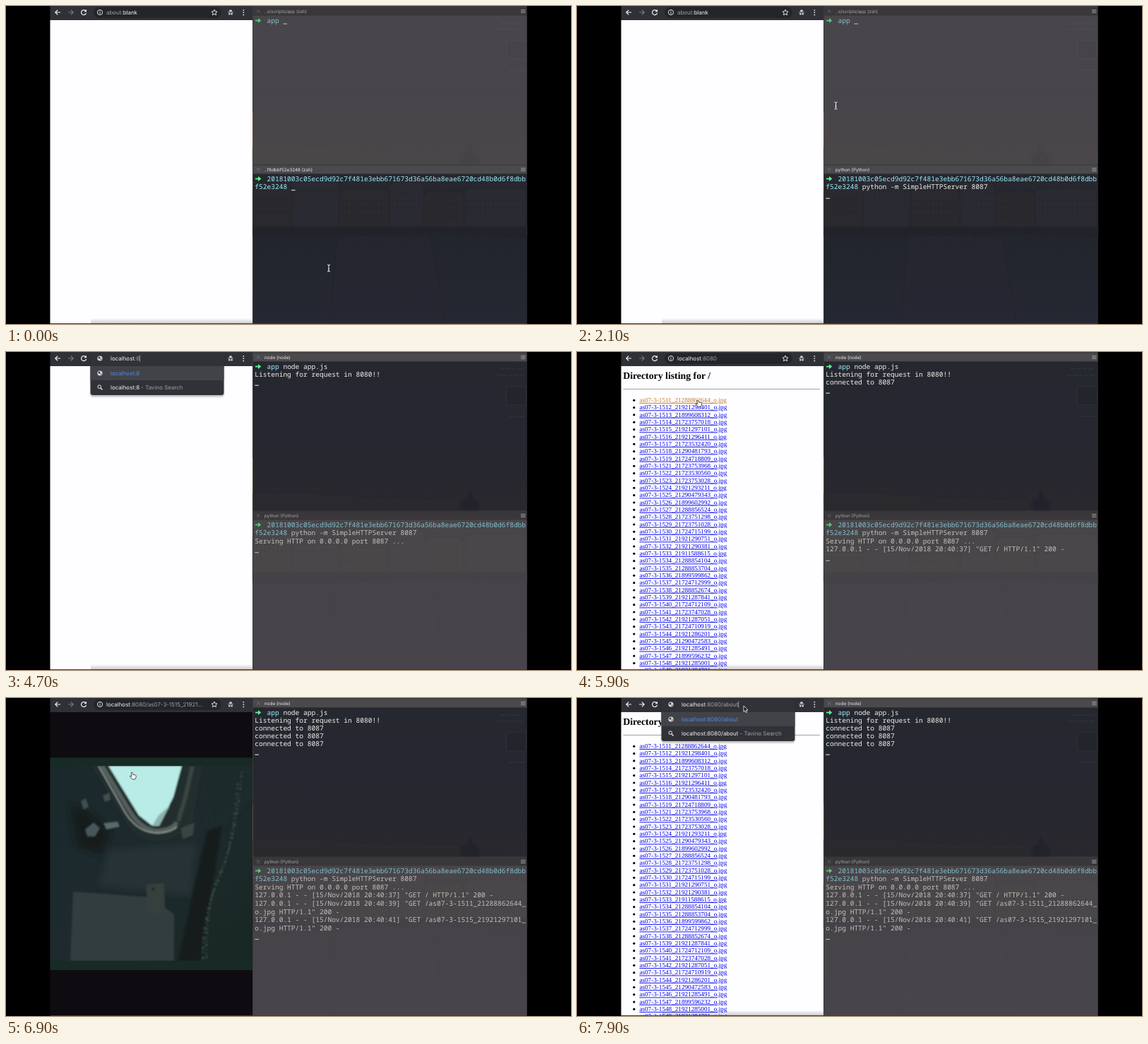
Animation of 800x450 px, one loop 8000 ms. Source, as an HTML page:

```html
<!DOCTYPE html>
<html lang="en">
<head>
<meta charset="utf-8">
<title>Proxy demo</title>
<style>
html, body { margin: 0; width: 100%; height: 100%; overflow: hidden; background: #000; }
svg { display: block; width: 800px; height: 450px; }
text { white-space: pre; text-rendering: geometricPrecision; }
.mono { font: 9.56px "Noto Sans Mono", monospace; fill: #eff0eb; }
.dir { fill: #9aedfe; }
.rows { opacity: .72; }
.on .rows { opacity: 1; }
.ui { font: 7.95px Inter, sans-serif; fill: #f1f3f4; }
.soft { fill: #9aa0a6; }
.tab { font: 6.35px Inter, sans-serif; fill: #a9a9a9; }
.on .tab { fill: #eee; }
.bar { fill: #39373a; }
.on .bar { fill: #4a494c; }
.on .veil { display: none; }
.head { font: bold 13.8px "Liberation Serif", serif; }
.link { font: 9.17px "Liberation Serif", serif; fill: #00e; text-decoration: underline; }
.link.hit { fill: #c9772c; }
.line { fill: none; stroke: #f1f3f4; stroke-width: 1.2; }
</style>
</head>
<body>
<svg viewBox="0 0 800 450">
  <defs>
    <linearGradient id="sky" x2="0" y2="1"><stop stop-color="#262830"/><stop offset=".5" stop-color="#262730"/><stop offset="1" stop-color="#29282e"/></linearGradient>
    <linearGradient id="water" x2="0" y2="1"><stop stop-color="#28282f"/><stop offset=".4" stop-color="#23252d"/><stop offset="1" stop-color="#252732"/></linearGradient>
    <linearGradient id="sea" x2=".45" y2="1"><stop stop-color="#5b8084"/><stop offset=".5" stop-color="#5a7a80"/><stop offset="1" stop-color="#4a6672"/></linearGradient>
    <linearGradient id="cabin" x2="1" y2="1"><stop stop-color="#1a292b"/><stop offset=".5" stop-color="#1e2a2e"/><stop offset="1" stop-color="#172722"/></linearGradient>
    <linearGradient id="shade" x2="0" y2="1"><stop stop-color="#000" stop-opacity="0"/><stop offset="1" stop-color="#000" stop-opacity=".2"/></linearGradient>
    <filter id="b1" x="-20%" y="-20%" width="140%" height="140%"><feGaussianBlur stdDeviation="1"/></filter>
    <filter id="b4" x="-50%" y="-50%" width="200%" height="200%"><feGaussianBlur stdDeviation="4"/></filter>
    <filter id="b12" x="-50%" y="-50%" width="200%" height="200%"><feGaussianBlur stdDeviation="12"/></filter>
    <filter id="cloud" x="-20%" y="-20%" width="140%" height="140%" color-interpolation-filters="sRGB">
      <feTurbulence type="fractalNoise" baseFrequency=".045 .06" numOctaves="5" seed="4" result="noise"/>
      <feColorMatrix in="noise" values="0 0 0 0 0  0 0 0 0 0  0 0 0 0 0  4 0 0 0 -1.35" result="holes"/>
      <feGaussianBlur in="SourceGraphic" stdDeviation="3"/>
      <feDisplacementMap in2="noise" scale="26" xChannelSelector="R" yChannelSelector="G"/>
      <feComposite in2="holes" operator="in"/>
    </filter>
    <clipPath id="pageClip"><rect x="62.5" y="20" width="286.5" height="429"/></clipPath>
    <clipPath id="photoClip"><rect x="71" y="98" width="274.5" height="275.5" rx="9"/></clipPath>
    <clipPath id="cabinClip"><rect x="62.5" y="96" width="286.5" height="276"/></clipPath>
    <g id="ibeam" fill="none" stroke="#eee" stroke-width="1"><path d="M-2-5q2 0 2 1.5q0-1.5 2-1.5M-2 5q2 0 2-1.5q0 1.5 2 1.5M0-4V4M-1 1H1"/></g>
    <path id="arrow" d="M0-4V4.5L1.9 2.8L3.2 5.6L4.6 5L3.3 2.2H6Z" fill="#111" stroke="#fff" stroke-width=".8"/>
    <path id="hand" d="M-2.2-4.4q1-.9 1.8 .2l.9 2.8l2.6 .2q1.6 .3 1.6 1.6l-.3 2.2l-1.1 2.4h-3.8l-3.4-3.6q-.5-1.2 .8-1.1l1.6 1Z" fill="#fff" stroke="#222" stroke-width=".8"/>
    <g id="prompt"><path d="M353 0H358" stroke="#5af78e" stroke-width="1.8"/><path d="M357-3.4L361.3 0L357 3.4Z" fill="#5af78e"/></g>
    <g id="globe"><circle r="3.6" fill="#d5d7da"/><path d="M-2.8-1.4L0-2.6L.5-.6L-1.2 .9ZM.6 1L2.6 .3L1.6 2.7Z" fill="#35363a"/></g>
  </defs>

  <rect width="800" height="450"/>
  <rect x="349" width="388.5" height="449.5" fill="#3b3a3c"/>
  <rect x="62.5" y="449" width="675" height="1" fill="#3b3a3c"/>
  <path d="M349.5 150V225" stroke="#5a5138" stroke-width="1"/>

  <!-- browser -->
  <rect x="62.5" y="20" width="286.5" height="429" id="paper" fill="#fefdff"/>
  <g clip-path="url(#pageClip)">
    <g id="list">
      <text class="head" x="65.2" y="37.6">Directory listing for /</text>
      <path d="M65.5 52.5H344" stroke="#8c8c8c" stroke-width=".8"/>
      <g id="links"></g>
    </g>
    <rect x="120" y="442" width="240" height="7" fill="url(#shade)"/>
    <g id="earth">
      <rect x="62" y="20" width="288" height="430" fill="#0e0c10"/>
      <rect x="62" y="84.5" width="288" height="300.5" fill="#182b27"/>
      <g clip-path="url(#photoClip)">
        <rect x="71" y="98" width="275" height="276" fill="url(#sea)"/>
        <g filter="url(#b12)">
          <path d="M275 190L360 140V290L300 300L255 270Z" fill="#8b918e" opacity=".65"/>
          <path d="M60 330L170 300L225 385H60Z" fill="#5e6c6c" opacity=".6"/>
          <path d="M275 385L300 320L360 275V385Z" fill="#2f6288" opacity=".85"/>
        </g>
        <path d="M66 94H94L76 118L71 160H66Z" fill="#31494b" filter="url(#b4)"/>
        <g filter="url(#cloud)">
          <path d="M196 158L235 112L275 92H335L325 122L288 140L255 164L222 170Z" fill="#a3cbc4"/>
          <path d="M262 205L290 168L318 150L352 140V195L318 205L300 222L272 226Z" fill="#b09c8a"/>
          <path d="M240 250L258 222L300 212L352 190V235L306 244L280 252L262 275L244 290Z" fill="#d0a888"/>
          <path d="M246 268L276 256L300 262L268 290L252 304L264 330L242 314Z" fill="#aa9585"/>
          <path d="M240 225L310 160L350 170V300L280 285Z" fill="#a8a49a" opacity=".55"/>
          <path d="M170 280L215 310L246 320L215 330L252 372L200 345Z" fill="#a99583" opacity=".8"/>
          <path d="M124 168L150 160L156 188L142 208L132 190Z" fill="#8fb2af" opacity=".8"/>
          <path d="M164 124L182 112L178 140Z" fill="#8fb2af" opacity=".7"/>
        </g>
        <path d="M256 238L272 231L287 228L278 236L262 245Z" fill="#e2bd9c" opacity=".75" filter="url(#b1)"/>
      </g>
    </g>
    <g id="window">
      <rect x="62" y="20" width="288" height="430" fill="#0e0c10"/>
      <rect x="62" y="84.5" width="288" height="300.5" fill="#172a25"/>
      <g clip-path="url(#cabinClip)">
        <rect x="62" y="96" width="288" height="276" fill="url(#cabin)"/>
        <g filter="url(#b4)">
          <path d="M90 150L118 160L150 190L134 222L100 210Z" fill="#131d1d"/>
          <path d="M146 215L270 205L262 280L130 265Z" fill="#253136"/>
          <path d="M265 96H350V140L290 200Z" fill="#1a2c2b"/>
        </g>
        <g filter="url(#b1)">
          <path d="M122 96L170 176Q190 208 222 202Q256 196 264 172L278 96Z" fill="#222d2d"/>
          <path d="M136 96L175 160Q192 187 214 188Q235 187 242 176" fill="none" stroke="#555e5c" stroke-width="6"/>
          <path d="M131 96L170 164Q188 191 215 191Q234 190 242 182" fill="none" stroke="#8d9691" stroke-width="1.8"/>
          <path d="M244 174L254 140L264 96" fill="none" stroke="#39453f" stroke-width="6"/>
          <path d="M145 96H249L237 140L217 180H206L188 166Z" fill="#b9ece6"/>
          <path d="M232 152L217 181H207L216 166Z" fill="#8fb3b0"/>
          <path d="M248 184L267 176L265 194L250 200Z" fill="#39443f"/>
          <path d="M112 186L124 176L133 184L126 196L115 196Z" fill="#46575a"/>
          <path d="M138 177L158 175L161 182L142 186Z" fill="#5b6b6d"/>
          <path d="M106 146L113 142L117 154L110 158ZM137 138L146 134L148 144L140 147Z" fill="#414f51"/>
          <path d="M95 274L205 282L238 306V372H91Z" fill="#303c40"/>
          <path d="M199 264L224 262L225 304L200 306Z" fill="#363f3d"/>
          <circle cx="208" cy="270" r="2" fill="#17211f"/>
          <path d="M285 188L306 180L275 372H244L266 270Z" fill="#131f1e"/>
          <path d="M334 105Q326 200 304 245T284 372" fill="none" stroke="#4c5d58" stroke-width="2" stroke-dasharray="1.5 3 3 5 1 4"/>
          <path d="M328 120Q322 210 300 260T279 372" fill="none" stroke="#35463f" stroke-width="3" stroke-dasharray="4 3 2 5"/>
        </g>
      </g>
    </g>
  </g>
  <rect x="62.5" width="286.5" height="20" fill="#303136"/>
  <rect x="124" y="1.5" width="181" height="15.5" rx="7.7" fill="#242529"/>
  <path class="line" d="M77 9H70M73.2 5.6L69.8 9L73.2 12.4"/>
  <path class="line" id="forward" d="M88 9H95M91.8 5.6L95.2 9L91.8 12.4"/>
  <path class="line" d="M112.6 6.6A3.5 3.5 0 1 0 113.5 9.8"/><path d="M114 4.7V8.2H110.5Z" fill="#f1f3f4"/>
  <path class="line" style="stroke-width:.9" d="M295 5L296.2 7.7L299 8L296.9 9.9L297.5 12.8L295 11.3L292.5 12.8L293.1 9.9L291 8L293.8 7.7Z"/>
  <g fill="#dfe1e3">
    <path d="M316 7.8L316.5 5.6H319.5L320 7.8ZM314.2 8.4H321.8V9.2H314.2Z"/>
    <circle cx="316.3" cy="11.2" r="1.2"/><circle cx="319.7" cy="11.2" r="1.2"/>
    <circle cx="336.3" cy="5.9" r=".9"/><circle cx="336.3" cy="9.2" r=".9"/><circle cx="336.3" cy="12.5" r=".9"/>
  </g>
  <g id="address">
    <circle class="line" cx="133" cy="9" r="3.6" style="stroke-width:.9"/><path class="line" d="M133 8.5V11.2M133 6.6V7.6" style="stroke-width:.9"/>
    <text class="ui" id="url" x="142" y="11.9"></text>
  </g>
  <g id="suggest">
    <path d="M119.5 0H308.5V57.5Q308.5 61 305 61H123Q119.5 61 119.5 57.5Z" fill="#000" opacity=".25" transform="translate(0 2.5)" filter="url(#b1)"/>
    <path d="M119.5 0H308.5V57.5Q308.5 61 305 61H123Q119.5 61 119.5 57.5Z" fill="#313237"/>
    <rect x="119.5" y="20" width="189" height="20" fill="#424348"/>
    <use href="#globe" x="133" y="9"/><use href="#globe" x="133" y="30"/>
    <circle class="line" cx="132.2" cy="49.2" r="2.3" style="stroke-width:1"/><path class="line" d="M134 51L136.5 53.5"/>
    <text class="ui" id="typed" x="148" y="11.9"></text>
    <text class="ui" id="match" x="148" y="32.9" style="fill:#4c8df0"></text>
    <text class="ui" id="query" x="148" y="53.3"></text>
  </g>

  <!-- terminal panes -->
  <g id="top">
    <rect class="bar" x="350" y="1.5" width="387.5" height="12"/>
    <rect x="350" y="13.5" width="387.5" height="211" fill="url(#sky)"/>
    <g filter="url(#b1)">
      <path d="M350 200H420L520 207L640 209V224H350Z" fill="#2a292e"/>
      <path d="M645 224V212L653 208L657 194L661 208L669 213V224Z" fill="#21222a"/>
    </g>
    <rect x="708.5" y="49" width="28" height="26" fill="#23252d" stroke="#2f3037"/>
    <path d="M700 24H733M694 33H735M712 91H734" stroke="#2d2f36" stroke-width="2" stroke-dasharray="6 2"/>
    <rect class="veil" x="350" y="13.5" width="387.5" height="211" fill="#726a6c" opacity=".45"/>
    <g class="rows"></g>
    <text class="tab" x="366" y="9.7"></text>
  </g>
  <g id="bottom">
    <rect class="bar" x="350" y="225.5" width="387.5" height="12"/>
    <rect x="350" y="237.5" width="387.5" height="211.5" fill="url(#water)"/>
    <g filter="url(#b1)" id="city"></g>
    <rect class="veil" x="350" y="237.5" width="387.5" height="211.5" fill="#726a6c" opacity=".45"/>
    <g class="rows"></g>
    <text class="tab" x="366" y="233.7"></text>
  </g>
  <g id="chrome" stroke="#aaa" stroke-width=".8"></g>
  <use id="mouse"/>
</svg>
<script>
const LOOP = 8000, STEP = 100, COLS = 67, CELL = 5.737;
const $ = s => document.querySelector(s);
const show = (s, on) => $(s).style.display = on ? '' : 'none';
const typing = (text, from, to, t) =>
  text.slice(0, Math.max(0, Math.round((t - from) / (to - from) * text.length)));

const photos = `1511_21288862644 1512_21921298401 1513_21899608312 1514_21723757018 1515_21921297101
1516_21921296411 1517_21723532420 1518_21290481793 1519_21724718809 1521_21723753968 1522_21723530560
1523_21723753028 1524_21921293211 1525_21290479343 1526_21899602992 1527_21288856524 1528_21723751298
1529_21723751028 1530_21724715199 1531_21921290751 1532_21921290381 1533_21911588615 1534_21288854104
1535_21288853704 1536_21899599862 1537_21724712999 1538_21288852674 1539_21921287841 1540_21724712109
1541_21723747028 1542_21921287051 1543_21724710919 1544_21921286201 1545_21290472583 1546_21921285491
1547_21899596232 1548_21921285001 1549_21921284701`.split(/\s+/).map(id => `as07-3-${id}_o.jpg`);

$('#links').innerHTML = photos.map((name, i) => {
  const y = 71.1 + i * 10.335;
  return `<circle cx="80.8" cy="${y - 2.8}" r="1.6"/><text class="link" x="88.4" y="${y}">${name}</text>`;
}).join('');

// Faint quayside buildings with rows of windows
const blocks = [[350, 262, 54], [405, 252, 66], [472, 266, 70], [543, 256, 48], [592, 270, 56], [649, 265, 88]];
$('#city').innerHTML = blocks.map(([x, y, w], i) =>
  `<path d="M${x} 312V${y}l6-7h${w - 12}l6 7V312Z" fill="${i % 2 ? '#2c2b30' : '#29292f'}"/>` +
  [10, 20, 30].map(d => `<path d="M${x + 4} ${y + d}H${x + w - 3}" stroke="#25252c" stroke-width="4" stroke-dasharray="2 4"/>`).join('')
).join('') + '<path d="M350 312H738V326L600 320L480 326H350Z" fill="#202229"/><path d="M470 326H600L620 449H460Z" fill="#292b35" opacity=".35"/>';

$('#chrome').innerHTML = [7.5, 231.5].map(y =>
  `<path d="M355 ${y - 2.2}l4.4 4.4m0-4.4l-4.4 4.4" opacity=".5"/><path d="M729 ${y - 2}h6.5m0 2h-6.5m0 2h6.5"/>`).join('');

const HASH = '20181003c05ecd9d92c7f481e3ebb671673d36a56ba8eae6720cd48b0d6f8dbbf52e3248';
const CLICK_TOP = 2200, SERVE = 2000, NODE = 3000, LIST = 5200, FIRST = 6000, BACK1 = 6500, SECOND = 6800, BACK2 = 7200;
const log = (sec, path) => `127.0.0.1 - - [15/Nov/2018 20:40:${sec}] "GET /${path} HTTP/1.1" 200 -`;
const served = [[2300, 'Serving HTTP on 0.0.0.0 port 8087 ...'], [LIST, log(37, '')],
  [FIRST, log(39, photos[0])], [SECOND, log(41, photos[4])]];
const proxied = [[3300, 'Listening for request in 8080!!'],
  ...[LIST, FIRST, SECOND].map(at => [at, 'connected to 8087'])];

const wrap = s => s.match(new RegExp(`.{1,${COLS}}`, 'g'));

function drawPane(id, { y, pitch, dir, cmd, ran, output, title, on, t }) {
  const rows = wrap('   ' + dir + ' ' + cmd), dirEnd = 3 + dir.length;
  let last = rows.length - 1, col = rows[last].length;
  if (ran) {
    for (const [at, line] of output) if (t >= at) rows.push(...wrap(line));
    last = rows.length;
    col = 0;
  }
  let html = `<use href="#prompt" y="${y - 3.3}"/>`;
  rows.forEach((row, i) => {
    const cut = Math.max(0, Math.min(row.length, dirEnd - i * COLS));
    html += `<text class="mono" x="352.3" y="${y + i * pitch}"><tspan class="dir">${row.slice(0, cut)}</tspan>${row.slice(cut)}</text>`;
  });
  html += `<rect x="${352.3 + col * CELL}" y="${y + last * pitch + .8}" width="5.6" height="1" fill="#eff0eb"/>`;
  const pane = $(id);
  pane.classList.toggle('on', on);
  pane.querySelector('.rows').innerHTML = html;
  pane.querySelector('.tab').textContent = title;
}

// time, x, y, shape; an empty shape hides the pointer until the next entry
const path = [
  [0, 457, 371, 'ibeam'], [300, 457, 371, ''], [1900, 457, 371, 'ibeam'], [2100, 366.5, 141, 'ibeam'],
  [2400, 366.5, 141, ''], [3700, 366.5, 141, 'arrow'], [4000, 170, 10, 'arrow'], [4200, 170, 10, ''],
  [5300, 170, 12, 'arrow'], [5600, 172, 72.5, 'hand'], [6500, 172, 72.5, 'hand'], [6700, 179.5, 110, 'hand'],
  [BACK2, 179.5, 110, 'arrow'], [7400, 236, 15, 'arrow'], [LOOP, 236, 15, 'arrow']];

function drawMouse(t) {
  const i = path.findIndex((p, n) => t < path[n + 1][0]);
  const [t0, x0, y0, shape] = path[i], [t1, x1, y1] = path[i + 1];
  const k = (t - t0) / (t1 - t0), e = k * k * (3 - 2 * k);
  const mouse = $('#mouse');
  mouse.setAttribute('href', '#' + shape);
  mouse.setAttribute('transform', `translate(${x0 + (x1 - x0) * e} ${y0 + (y1 - y0) * e})`);
  show('#mouse', shape);
}

const split = s => {
  const at = 'localhost'.length;
  return `${s.slice(0, at)}<tspan class="soft">${s.slice(at)}</tspan>`;
};

function drawBrowser(t) {
  const page = t < LIST ? 'blank' : t < FIRST ? 'list' : t < BACK1 ? 'earth' : t < SECOND ? 'list' : t < BACK2 ? 'window' : 'list';
  for (const id of ['list', 'earth', 'window']) show('#' + id, page === id);
  show('#paper', page === 'blank' || page === 'list');
  const hit = t >= 5900 && t < FIRST ? 0 : t >= 6700 && t < SECOND ? 4 : -1;
  document.querySelectorAll('.link').forEach((el, i) => el.classList.toggle('hit', i === hit));
  $('#forward').style.stroke = page === 'list' && t >= BACK1 ? '' : '#77797e';

  const host = 'localhost:8080';
  const file = page === 'earth' ? photos[0] : page === 'window' ? photos[4] : '';
  $('#url').innerHTML = t < 5000 ? '<tspan class="soft">about:</tspan>blank'
    : split(host + (file && '/' + file.slice(0, 17) + '...'));

  const entry = t < 5100 ? typing(host, 4100, 4900, t) : t >= 7500 ? host + typing('/about', 7400, 7900, t) : '';
  show('#suggest', entry);
  show('#address', !entry);
  const caret = '<tspan fill="#d5d7da" dx="-.8">|</tspan>';
  $('#typed').innerHTML = split(entry) + caret;
  $('#match').textContent = entry;
  $('#query').innerHTML = `${entry}<tspan class="soft"> - Tavino Search</tspan>`;
}

function draw(t) {
  const topOn = t >= CLICK_TOP;
  drawPane('#top', {
    t, y: 23.9, pitch: 11, dir: 'app', on: topOn, ran: t >= NODE, output: proxied,
    cmd: typing('node app.js', 2300, 2900, t),
    title: t < NODE ? '..s/scripts/app (zsh)' : t < 3200 ? 'node' : 'node (node)'
  });
  drawPane('#bottom', {
    t, y: 247.8, pitch: 11.55, dir: HASH, on: !topOn, ran: t >= SERVE, output: served,
    cmd: typing('python -m SimpleHTTPServer 8087', 100, 1800, t),
    title: t < SERVE ? '..f8dbbf52e3248 (zsh)' : 'python (Python)'
  });
  drawBrowser(t);
  drawMouse(t);
}

const start = performance.now();
let shown = -1;
function tick() {
  const t = Math.floor((performance.now() - start) % LOOP / STEP) * STEP;
  if (t !== shown) draw(shown = t);
  requestAnimationFrame(tick);
}
tick();
</script>
</body>
</html>
```
